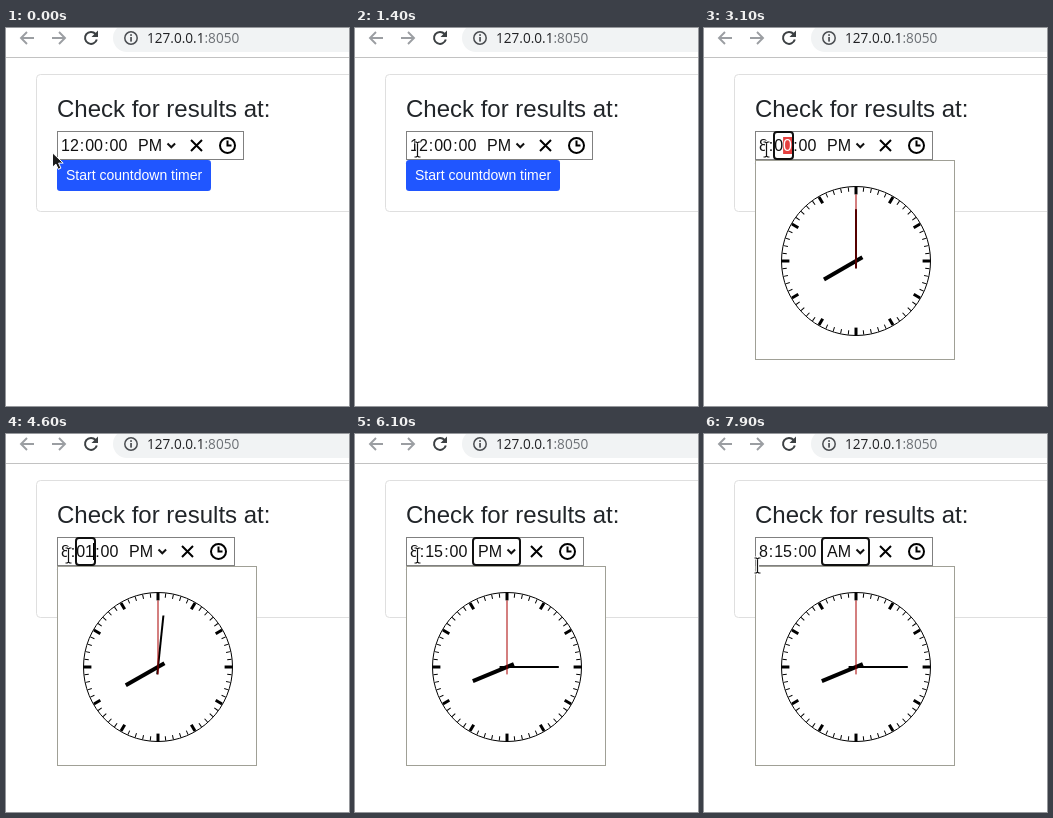
Animation of 343 by 378 pixels, one loop 8 s. Source, as an HTML page with a canvas:

```html
<!DOCTYPE html>
<html lang="en">
<head>
<meta charset="utf-8">
<title>Countdown form</title>
<style>
  html, body { margin: 0; width: 100%; height: 100%; overflow: hidden; background: #fff; }
  canvas { display: block; width: 343px; height: 378px; }
</style>
</head>
<body>
<canvas id="stage"></canvas>
<script>
const W = 343, H = 378, LOOP = 8000;
const SANS = '"Liberation Sans", Arial, sans-serif';
const URL_FONT = '13.6px "Open Sans", "Noto Sans", sans-serif';
const DIGIT = 8.9, BASE = 123;

const canvas = document.getElementById('stage');
const dpr = window.devicePixelRatio || 1;
canvas.width = W * dpr;
canvas.height = H * dpr;
const ctx = canvas.getContext('2d');

function text(str, x, y, font, color) {
  ctx.font = font;
  ctx.fillStyle = color;
  ctx.fillText(str, x, y);
}

function box(x, y, w, h, color) {
  ctx.fillStyle = color;
  ctx.fillRect(x, y, w, h);
}

function frame(x, y, w, h, color) {
  ctx.strokeStyle = color;
  ctx.lineWidth = 1;
  ctx.strokeRect(x + 0.5, y + 0.5, w - 1, h - 1);
}

function rounded(x, y, w, h, r) {
  ctx.beginPath();
  ctx.roundRect(x, y, w, h, r);
}

function path(d, color, width) {
  ctx.strokeStyle = color;
  ctx.lineWidth = width;
  ctx.stroke(new Path2D(d));
}

function circle(x, y, r, color, width) {
  ctx.beginPath();
  ctx.arc(x, y, r, 0, Math.PI * 2);
  ctx.strokeStyle = color;
  ctx.lineWidth = width;
  ctx.stroke();
}

function toolbar() {
  const pale = '#9b9ea2', dark = '#3c4043';
  rounded(107, -4, 300, 28, 14);
  ctx.fillStyle = '#f1f3f4';
  ctx.fill();
  box(0, 29, W, 1, '#c2c2c2');
  path('M28 10H15.5M21 4L15 10L21 16', pale, 1.9);
  path('M46 10H58.5M53 4L59 10L53 16', pale, 1.9);
  path('M89.6 6A6 6 0 1 0 90.8 11.5', dark, 2);
  ctx.fillStyle = dark;
  ctx.fill(new Path2D('M92 2.5V9H85.5Z'));
  circle(125, 10, 6.2, '#4a4d51', 1.5);
  box(124.2, 9, 1.7, 4.6, '#4a4d51');
  box(124.2, 6.2, 1.7, 1.7, '#4a4d51');
  text('127.0.0.1', 141, 15, URL_FONT, '#202124');
  const host = ctx.measureText('127.0.0.1').width;
  text(':8050', 141 + host, 15, URL_FONT, '#6b6f74');
}

function card() {
  rounded(30.5, 46.5, 400, 137, 4);
  ctx.strokeStyle = '#dfdfdf';
  ctx.lineWidth = 1;
  ctx.stroke();
  text('Check for results at:', 51, 89, '24px ' + SANS, '#212529');
  rounded(51, 132, 154, 31, 3.2);
  ctx.fillStyle = '#2056ff';
  ctx.fill();
  text('Start countdown timer', 60, 152, '14px ' + SANS, '#fff');
}

function focusRing(left, right) {
  rounded(left + 1, 104, right - left - 2, 27, 3);
  ctx.strokeStyle = '#101010';
  ctx.lineWidth = 2;
  ctx.stroke();
}

function digits(str, x, selected) {
  const font = '16px ' + SANS;
  text(str, x, BASE, font, '#111');
  if (!selected) return;
  const sx = x + (str.length - selected) * DIGIT;
  box(sx, 109, selected * DIGIT, 17, '#e5403f');
  text(str.slice(-selected), sx, BASE, font, '#fff');
}

function picker(s) {
  const hour = String(s.hour), min = String(s.min).padStart(2, '0');
  const shift = hour.length > 1 ? 0 : -9;
  const font = '16px ' + SANS;
  const mx = 79.2 + shift, sx = 103.6 + shift, px = 132 + shift;

  box(51, 103, 187 + shift, 29, '#fff');
  frame(51, 103, 187 + shift, 29, '#808080');
  digits(hour, 55, s.focus === 'hour' ? 2 : 0);
  text(':', mx - 5.4, BASE, font, '#111');
  digits(min, mx, s.focus === 'min' && !s.caret ? 1 : 0);
  text(':', sx - 5.4, BASE, font, '#111');
  digits('00', sx, s.focus === 'sec' ? 1 : 0);
  text(s.half, px, BASE, font, '#111');
  path(`M${px + 29.5} 115.5l3.8 3.8l3.8 -3.8`, '#111', 2);

  const cx = 190.5 + shift, kx = 221.5 + shift;
  path(`M${cx - 5.5} 112l11 11m0 -11l-11 11`, '#000', 2);
  circle(kx, 117.5, 7.5, '#000', 2);
  path(`M${kx} 112.5v5h4`, '#000', 2);

  if (s.caret) box(87, 109, 1, 17, '#000');
  const rings = { hour: [53, 75], min: [69, 90], sec: [93, 115], half: [117, 166] };
  if (s.focus) focusRing(...rings[s.focus]);
}

// Bar from radius a to radius b, with 0 degrees pointing up
function bar(deg, a, b, width, color) {
  ctx.save();
  ctx.rotate(deg * Math.PI / 180);
  box(-width / 2, -b, width, b - a, color);
  ctx.restore();
}

function clock(s) {
  box(51, 132, 200, 200, '#fff');
  frame(51, 132, 200, 200, '#a0a096');
  ctx.save();
  ctx.translate(152, 233);
  circle(0, 0, 74.5, '#000', 1);
  for (let i = 0; i < 60; i++) {
    if (i % 5) bar(i * 6, 69.6, 74, 1, '#000');
    else bar(i * 6, 66.6, 74, 3, '#000');
  }
  bar(s.hour * 30 + s.min / 2, -7.4, 37, 4, '#000');
  bar(s.min * 6, -7.4, 51.8, 2, '#000');
  bar(0, -7.4, 66.6, 2, 'rgba(170,0,0,.5)');
  ctx.restore();
}

const pointers = {
  arrow() {
    const p = new Path2D('M.5 .8V15.2L3.9 12.1L6.3 17.3L8.9 16.1L6.6 11.1H11.2Z');
    ctx.fillStyle = '#1a1a1a';
    ctx.fill(p);
    ctx.strokeStyle = '#fff';
    ctx.lineWidth = 1;
    ctx.stroke(p);
  },
  beam() {
    const d = 'M-3 -7.5H-1.2L0 -6.5L1.2 -7.5H3M0 -6.5V6.5M-3 7.5H-1.2L0 6.5L1.2 7.5H3';
    path(d, '#fff', 3.2);
    path(d, '#111', 1.2);
  },
  hand() {
    const p = new Path2D('M-1.5 1Q0 -1 1.5 1V6L7 7.5Q8.5 8 8 10L6.5 16H-1L-5 10Q-5 8 -3.5 8.5L-1.5 10Z');
    ctx.fillStyle = '#1a1a1a';
    ctx.fill(p);
    ctx.strokeStyle = '#fff';
    ctx.lineWidth = 1;
    ctx.stroke(p);
  }
};

// [time, pointer, x, y]
const moves = [
  [0, 'arrow', 46, 124], [200, 'arrow', 44, 127], [300, 'arrow', 43, 129],
  [600, 'arrow', 44, 132], [700, 'arrow', 45, 136], [800, 'arrow', 47, 139],
  [900, 'arrow', 49, 141], [1000, 'hand', 53, 140], [1100, 'hand', 57, 137],
  [1200, 'hand', 60, 133], [1300, 'beam', 61.5, 126], [1400, 'beam', 62.5, 121.5],
  [7900, 'beam', 53.5, 131.5]
];

// Each entry overrides the state before it
const edits = [
  [0, { hour: 12, min: 0, half: 'PM', focus: '', open: false, caret: false }],
  [1800, { open: true, focus: 'hour' }],
  [3100, { hour: 8, focus: 'min' }],
  [4600, { min: 1, caret: true }],
  [5100, { min: 15 }],
  [5200, { focus: 'sec', caret: false }],
  [6100, { focus: 'half' }],
  [6700, { half: 'AM' }]
];

function draw(t) {
  const past = e => e[0] <= t;
  const s = Object.assign({}, ...edits.filter(past).map(e => e[1]));
  const [, kind, x, y] = moves.filter(past).pop();

  ctx.setTransform(dpr, 0, 0, dpr, 0, 0);
  box(0, 0, W, H, '#fff');
  toolbar();
  card();
  if (s.open) clock(s);
  picker(s);
  ctx.translate(x, y);
  pointers[kind]();
}

const start = performance.now();
function tick() {
  draw((performance.now() - start) % LOOP);
  requestAnimationFrame(tick);
}
tick();
</script>
</body>
</html>
```
